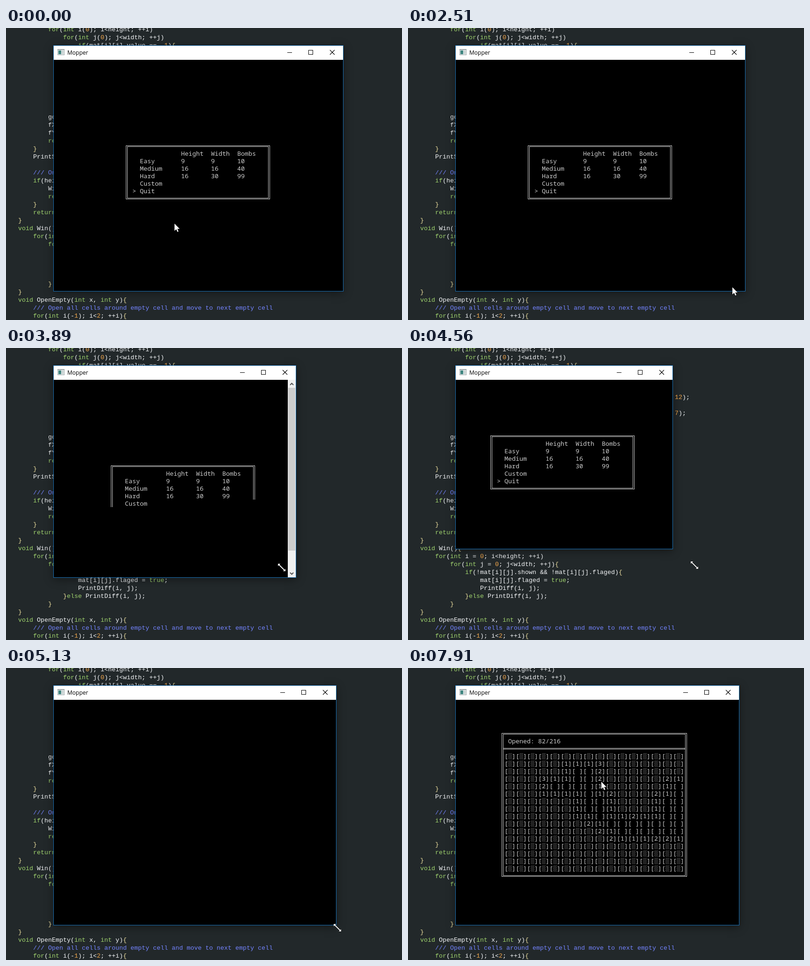
Recreate the animation shown at these times as an HTML page with a canvas. Size 846x624 px, loop 8 s.

```html
<!DOCTYPE html>
<html lang="en">
<head>
<meta charset="utf-8">
<title>Mopper</title>
<style>
html, body { margin: 0; width: 100%; height: 100%; overflow: hidden; background: #22282a; }
canvas { display: block; }
</style>
</head>
<body>
<canvas id="stage" width="846" height="624"></canvas>
<script>
const ctx = document.getElementById('stage').getContext('2d', { alpha: false });
const LOOP = 8000;
const LEFT = 102, TOP = 68, CELL_W = 8, CELL_H = 16;
const MONO = '13.333px "Noto Sans Mono", "DejaVu Sans Mono", monospace';
const GRAY = '#cccccc';

const code = `        for(int i(0); i<height; ++i)
            for(int j(0); j<width; ++j)
                if(mat[i][j].value == -1){








        gotoxy
        fX
        fY
        return
    }
    PrintS

    /// On
    if(heig
        Win
        return
    }
    return
}
void Win(){
    for(int i = 0; i<height; ++i)
        for(int j = 0; j<width; ++j){
            if(!mat[i][j].shown && !mat[i][j].flaged){
                mat[i][j].flaged = true;
                PrintDiff(i, j);
            }else PrintDiff(i, j);
        }
}
void OpenEmpty(int x, int y){
    /// Open all cells around empty cell and move to next empty cell
    for(int i(-1); i<2; ++i){`.split('\n');
code[6] = ' '.repeat(68) + '12);';
code[8] = ' '.repeat(68) + '7);';

const menu = [
  ['', 'Height', 'Width', 'Bombs'],
  ['Easy', '9', '9', '10'],
  ['Medium', '16', '16', '40'],
  ['Hard', '16', '30', '99'],
  ['Custom'],
  ['Quit'],
];
const menuCols = [4, 15, 23, 30];

// '#' is a closed cell, '.' an empty one
const closedRow = '#'.repeat(16);
const board = [
  closedRow,
  '#####1113#######',
  '#####1..2#######',
  '###311..2#####21',
  '###2....1#####1.',
  '###1111.12###21.',
  '######1..1###1..',
  '######1..1###1..',
  '######11.11211..',
  '#######21.......',
  '########21......',
  '#########2111221',
  closedRow, closedRow, closedRow, closedRow,
];

// Opening order: right part downwards, then left part upwards
const openOrder = [];
for (let r = 0; r < 16; r++) for (let c = 9; c < 16; c++) openOrder.push([r, c]);
for (let r = 15; r >= 0; r--) for (let c = 8; c >= 0; c--) openOrder.push([r, c]);
const openRank = new Map(openOrder.filter(([r, c]) => board[r][c] !== '#')
  .map(([r, c], i) => [r * 16 + c, i]));

// start, end, steps, x, y, easing
const linear = p => p;
const easeOut = p => 1 - (1 - p) ** 2;
const easeInOut = p => p * p * (3 - 2 * p);
const pointerPath = [
  [0, 0, 1, 360, 418, linear],
  [220, 930, 9, 338, 292, easeInOut],
  [1030, 1200, 3, 345, 268, linear],
  [1290, 1820, 7, 393, 409, easeInOut],
  [1910, 2670, 10, 706, 560, easeOut],
  [2760, 2940, 3, 727, 570, linear],
  [3040, 3220, 3, 724, 569, linear],
  [3570, 3890, 4, 589, 469, linear],
  [3990, 4290, 4, 569, 436, easeOut],
  [4560, 4560, 1, 612, 464, linear],
  [4655, 5130, 6, 708, 555, easeOut],
  [5225, 5320, 2, 711, 556, linear],
  [5600, 6390, 10, 330, 315, easeInOut],
  [6480, 6590, 2, 328, 307, linear],
  [6930, 7340, 5, 420, 262, easeInOut],
  [7490, 7910, 6, 413, 243, easeOut],
];
const cornerPath = [
  [0, 0, 1, 720, 562, linear],
  [3570, 3890, 4, 619, 490, linear],
  [3990, 4290, 4, 570, 433, easeOut],
  [4390, 4390, 1, 565, 429, linear],
  [4655, 5130, 6, 705, 549, easeOut],
  [5225, 5320, 2, 707, 549, linear],
];

// time, column, row, finished rows, columns of the row in progress
const menuStates = [
  [0, 19, 11, 8, 0], [3670, 17, 11, 3, 0], [3780, 16, 11, 8, 0], [3890, 15, 11, 5, 11],
  [3990, 15, 11, 8, 0], [4090, 11, 8, 8, 0], [4190, 10, 8, 4, 0], [4290, 9, 7, 6, 0],
  [4390, 9, 7, 8, 0], [4750, 11, 8, 8, 0], [4845, 13, 9, 5, 0], [4940, 15, 10, 8, 0],
  [5035, 17, 11, 8, 0], [5130, 18, 11, 0, 0], [5225, 18, 11, 8, 0],
];
const boardStates = [[6760, 4, 37], [6850, 13, 20], [6930, 20, 0]];
const openedStates = [
  [0, 0], [7240, 20], [7340, 44], [7490, 50], [7575, 56],
  [7660, 62], [7745, 69], [7830, 76], [7910, 82],
];

const latest = (states, t) => states.filter(s => s[0] <= t).pop();

function follow(path, t) {
  let [, , , x, y] = path[0];
  for (const [start, end, steps, toX, toY, ease] of path) {
    if (t < start) break;
    const done = end > start ? Math.floor((t - start) / (end - start) * (steps - 1) + 1e-6) + 1 : steps;
    const p = ease(Math.min(1, done / steps));
    x += (toX - x) * p;
    y += (toY - y) * p;
  }
  return [Math.round(x), Math.round(y)];
}

function rect(x, y, w, h, color) {
  ctx.fillStyle = color;
  ctx.fillRect(x, y, w, h);
}

function line(points, color, width = 1) {
  ctx.beginPath();
  points.forEach(([x, y]) => ctx.lineTo(x, y));
  ctx.strokeStyle = color;
  ctx.lineWidth = width;
  ctx.stroke();
}

const cellX = col => LEFT + col * CELL_W;
const cellY = row => TOP + row * CELL_H;

function print(text, col, row) {
  ctx.font = MONO;
  ctx.fillStyle = GRAY;
  ctx.fillText(text, cellX(col), cellY(row) + 13);
}

const shade = (() => {
  const tile = document.createElement('canvas');
  tile.width = tile.height = 4;
  const g = tile.getContext('2d');
  g.fillStyle = '#858585';
  [[0, 0], [2, 0], [1, 2], [3, 2]].forEach(([x, y]) => g.fillRect(x, y, 1, 1));
  return ctx.createPattern(tile, 'repeat');
})();

function codeColor(token) {
  if (token.startsWith('///')) return '#7484ff';
  if (/^(for|int|void|return|re|if|else|true)$/.test(token)) return '#a0d46e';
  if (/^\d/.test(token)) return '#f0a64c';
  if (/^[{}]/.test(token)) return '#eee0a0';
  return '#f4f6f8';
}

function drawCode() {
  rect(0, 0, 846, 624, '#22282a');
  ctx.font = '13.333px "Liberation Mono", monospace';
  code.forEach((text, row) => {
    for (const m of text.matchAll(/\/\/\/.*|[A-Za-z]+|\d+|[{}]|[^\w\s{}]+/g)) {
      ctx.fillStyle = codeColor(m[0]);
      ctx.fillText(m[0], 26 + m.index * 8, 7 + row * 17);
    }
  });
}

function drawWindow(right, bottom) {
  ctx.save();
  ctx.shadowColor = 'rgba(0,0,0,.4)';
  ctx.shadowBlur = 18;
  ctx.shadowOffsetY = 4;
  rect(101, 37, right - 100, bottom - 36, '#1a72b8');
  ctx.restore();
  rect(LEFT, 38, right - LEFT, 30, '#ffffff');
  rect(LEFT, TOP, right - LEFT, bottom - TOP, '#000000');

  rect(110, 45, 15, 13, '#9aa3a6');
  rect(111, 47, 13, 10, '#eef2f2');
  rect(112, 48, 6, 8, '#3f8580');
  rect(119, 48, 4, 8, '#c9d3d3');

  ctx.font = '12px "Open Sans", "Noto Sans", sans-serif';
  ctx.fillStyle = '#000';
  ctx.fillText('Mopper', 131, 57);
  rect(right - 119, 52, 10, 1, '#000');
  ctx.strokeStyle = '#000';
  ctx.lineWidth = 1;
  ctx.strokeRect(right - 73.5, 47.5, 9, 9);
  line([[right - 28, 47], [right - 18, 57]], '#000', 1.1);
  line([[right - 18, 47], [right - 28, 57]], '#000', 1.1);
}

function drawScrollbar(right, bottom) {
  const x = right - 17, mid = right - 8.5;
  rect(x, TOP, 17, bottom - TOP, '#f0f0f0');
  rect(x + 1, TOP + 17, 15, bottom - TOP - 74, '#cdcdcd');
  line([[mid - 3.5, 79], [mid, 75.5], [mid + 3.5, 79]], '#505050', 2);
  line([[mid - 3.5, bottom - 10], [mid, bottom - 6.5], [mid + 3.5, bottom - 10]], '#505050', 2);
}

function ring(x0, y0, x1, y1) {
  ctx.strokeStyle = GRAY;
  ctx.lineWidth = 1;
  ctx.strokeRect(x0 + 0.5, y0 + 0.5, x1 - x0, y1 - y0);
}

function doubleFrame(col, row, cols, rows) {
  const x0 = cellX(col), y0 = cellY(row);
  const x1 = cellX(col + cols - 1), y1 = cellY(row + rows - 1);
  ring(x0 + 2, y0 + 7, x1 + 5, y1 + 9);
  ring(x0 + 5, y0 + 9, x1 + 2, y1 + 7);
}

// Limits drawing to the part the console has printed so far
function printed(col, row, cols, fullRows, partCols, draw) {
  ctx.save();
  ctx.beginPath();
  ctx.rect(cellX(col), cellY(row), cols * CELL_W, fullRows * CELL_H);
  ctx.rect(cellX(col), cellY(row + fullRows), partCols * CELL_W, CELL_H);
  ctx.clip();
  draw();
  ctx.restore();
}

function drawMenu(t, pointerY) {
  const [, col, row, fullRows, partCols] = latest(menuStates, t);
  const selected = Math.max(0, Math.min(4, Math.floor((pointerY - 276) / CELL_H)));
  printed(col, row, 39, fullRows, partCols, () => {
    doubleFrame(col, row, 39, 8);
    menu.forEach((cells, i) =>
      cells.forEach((text, j) => print(text, col + menuCols[j], row + 1 + i)));
    print('>', col + 2, row + 2 + selected);
  });
}

function drawBoard(t) {
  const [, fullRows, partCols] = latest(boardStates, t);
  const opened = latest(openedStates, t)[1];
  printed(12, 4, 50, fullRows, partCols, () => {
    doubleFrame(12, 4, 50, 20);
    for (const dy of [7, 9]) rect(cellX(12) + 5, cellY(6) + dy, 49 * CELL_W - 2, 1, GRAY);
    print(`Opened: ${opened}/216`, 14, 5);
    board.forEach((cells, r) => [...cells].forEach((value, c) => {
      const col = 13 + c * 3, row = 7 + r;
      print('[', col, row);
      print(']', col + 2, row);
      const isOpen = openRank.get(r * 16 + c) < opened;
      if (!isOpen) rect(cellX(col + 1), cellY(row) + 1, CELL_W, 15, shade);
      else if (value !== '.') print(value, col + 1, row);
    }));
  });
}

const arrow = new Path2D('M0 0V15.5L3.7 12.1 6.2 17.8 8.6 16.8 6.1 11.2H11Z');
const resize = new Path2D('M-8-8H-3L-4.7-6.1 6.1 4.7 8 3V8H3L4.7 6.1-6.1-4.7-8-3Z');

function drawPointer(x, y, shape) {
  ctx.save();
  ctx.translate(x, y);
  ctx.strokeStyle = '#000';
  ctx.lineWidth = 1;
  ctx.stroke(shape);
  ctx.fillStyle = '#fff';
  ctx.fill(shape);
  ctx.restore();
}

function draw(t) {
  const [right, bottom] = follow(cornerPath, t);
  const [x, y] = follow(pointerPath, t);
  drawCode();
  drawWindow(right, bottom);

  ctx.save();
  ctx.beginPath();
  ctx.rect(LEFT, TOP, right - LEFT, bottom - TOP);
  ctx.clip();
  if (t < 6760) drawMenu(t, y);
  else drawBoard(t);
  if (t >= 3670 && t < 4390) drawScrollbar(right, bottom);
  ctx.restore();

  drawPointer(x, y, t >= 2850 && t < 5600 ? resize : arrow);
}

const start = performance.now();
function tick() {
  draw((performance.now() - start) % LOOP);
  requestAnimationFrame(tick);
}
tick();
</script>
</body>
</html>
```
